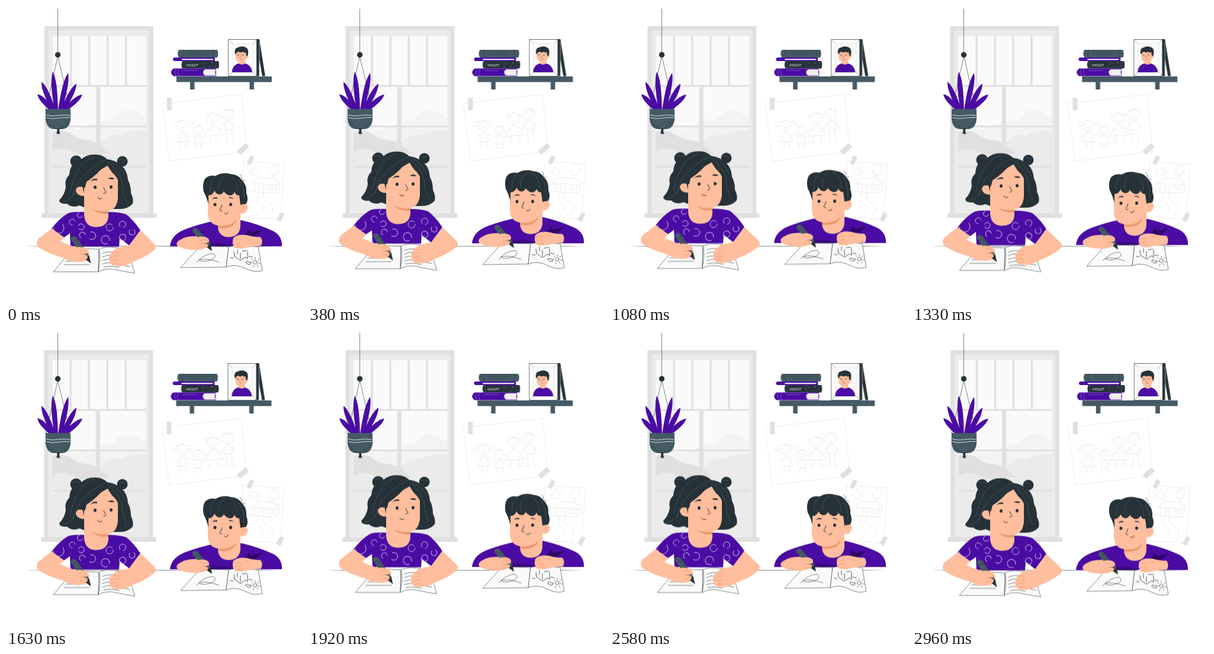
An HTML page that plays this animation: 500 px wide and 500 px high, repeating every 3 s.

```html
<!DOCTYPE html>
<html lang="en">
<head>
<meta charset="utf-8">
<title>Drawing together</title>
<style>
html, body { margin: 0; width: 100%; height: 100%; overflow: hidden; background: #fff; }
svg { display: block; width: 100vw; height: 100vh; }
.purple { fill: #4b0ca3; }
.dark { fill: #263238; }
.slate { fill: #455a64; }
.skin { fill: #ffbe9d; }
.shade { fill: #eb996e; }
.paper { fill: #fafafa; stroke: #263238; stroke-width: .6; stroke-linejoin: round; }
.g1 { fill: #e0e0e0; }
.g2 { fill: #ebebeb; }
.g3 { fill: #f3f3f3; }
.g4 { fill: #fafafa; }
.ink, .thin, .strand, .sketch, .crease, .fold { fill: none; stroke-linecap: round; stroke-linejoin: round; }
.ink { stroke: #263238; stroke-width: 1; }
.thin { stroke: #263238; stroke-width: .6; }
.strand { stroke: #5b6f79; stroke-width: .5; }
.sketch { stroke: #e3e3e3; stroke-width: .7; }
.crease { stroke: #eb996e; stroke-width: .7; }
.fold { stroke: #2d0762; stroke-width: .7; }
.sheet { fill: #fff; stroke: #e6e6e6; stroke-width: .7; }
.rings { fill: none; stroke: #d9c9f2; stroke-width: .9; stroke-linecap: round; }
</style>
</head>
<body>
<svg viewBox="0 0 500 500">

  <g transform="translate(.9 0)"><g id="room">
    <!-- window -->
    <path class="g1" d="M64 34H248V350H64z"/>
    <path class="g2" d="M71 41H241V350H71z"/>
    <path class="g4" d="M78 51H236V271H78z"/>
    <path class="g3" d="M78 212Q100 202 120 209Q140 200 158 197Q170 189 180 193Q194 174 207 176Q220 177 236 190V271H78z"/>
    <path class="g2" d="M152 236Q176 212 192 219Q212 207 236 211V271H152z"/>
    <path class="g1" d="M78 213Q92 208 106 214Q118 223 130 226Q150 226 164 240Q180 254 204 262H78z"/>
    <path class="g2" d="M78 246Q95 236 112 246Q136 256 160 250Q196 246 236 256V350H78z"/>
    <g class="g1">
      <path d="M107 51h3.500v83h-3.500zM138 51h3.500v83h-3.500zM169 51h3.500v83h-3.500zM200 51h3.500v83h-3.500z"/>
      <path d="M78 133.500h158v3H78zM78 202h158v3H78zM78 270h158v3H78zM151.500 137h7v213h-7z"/>
      <path d="M59 350H253V358H59z"/>
    </g>

    <!-- shelf -->
    <path class="slate" d="M287 119H448V128.5H287zM310 128h7.500v13h-7.500zM410.500 128h7.500v13h-7.500z"/>
    <path class="slate" d="M291 74H356Q359 80 356 87H291Q287 80 291 74z"/>
    <path class="strand" style="stroke:#263238" d="M298 74q-2 6 0 13M349 74q2 6 0 13M304 78h38M308 82h30"/>
    <path class="purple" d="M283 87H352V93H283Q279 90 283 87z"/>
    <path d="M296 89.200H349V91.300H296z" fill="#f5f5f5"/>
    <path class="dark" d="M297 93H358Q360 99 358 105.500H297Q294 99 297 93z"/>
    <path class="strand" d="M300 93v12M332 93v12"/>
    <g fill="#cfd8dc"><circle cx="337" cy="97" r=".6"/><circle cx="343" cy="102" r=".6"/><circle cx="347" cy="96" r=".7"/><circle cx="353" cy="101" r=".6"/><circle cx="354" cy="96" r=".5"/></g>
    <text x="303.500" y="101.700" font-family="Lato, 'Open Sans', sans-serif" font-size="6.400" font-style="italic" fill="#fff">VIOLET</text>
    <path class="purple" d="M282 105.500H354V118.500H282Q274 112 282 105.500z"/>
    <path d="M354 107H335Q329 112 335 117.500H354Q351 112 354 107z" fill="#f0f0f0"/>
    <path d="M286 106q-4 6 0 12M291 106q-4 6 0 12M298 109h24" fill="none" stroke="#9d7dd0" stroke-width=".6"/>

    <!-- portrait -->
    <path class="dark" d="M422 56H427L437 118.500H432L427 90V118.500H422z"/>
    <path class="strand" style="stroke:#fff" d="M427 62V118"/>
    <path d="M374.500 56.500H422.500V118.500H374.500z" fill="#fff" stroke="#263238" stroke-width=".7"/>
    <path d="M381 63H417V112H381z" fill="#fafafa" stroke="#d0d0d0" stroke-width=".5"/>
    <path class="thin" style="stroke-width:.4" d="M375 56.500l6 6.500M422 56.500l-5 6.500M375 118.500l6-6.500M422 118.500l-5-6.500"/>
    <path class="purple" d="M381 112Q381 100 392 97H403Q414 100 415 112z"/>
    <path class="skin" d="M387 76H407V83H408q2 3-2 5L403 93V97Q398 101 392 97V94Q387 92 387 86z"/>
    <path class="dark" d="M386 81Q384 71 391 70Q399 66 406 71Q410 76 407 85L405 84L404 78Q401 80 399 77Q395 80 392 77Q388 78 387 82z"/>
    <g class="dark"><circle cx="391" cy="83.500" r=".8"/><circle cx="399" cy="83.500" r=".8"/></g>
    <path class="thin" style="stroke-width:.4" d="M395 84l-.6 3.500M395 90q2 1 3-.5M389.500 81.500h2.500M398 81.500h2.500"/>

    <!-- family drawing -->
    <path class="sheet" d="M263 165L397 149L406 246L275 262z"/>
    <g class="sketch">
      <circle cx="297" cy="202" r="9"/>
      <path d="M289 198Q297 188 305 198M290 196q-8-3-10 8q5 1 8-3M305 195q8-2 10 5q-4 3-8 1M297 211L288 230L309 229zM292 216L284 222M302 215L311 219M295 230V240h-4M303 230V239h4M294 204q3 4 7 0M294 200v1M300 200v1"/>
      <circle cx="324" cy="211" r="8"/>
      <path d="M318 205q6-7 12 0M324 219q-7 1-6 14h13q0-14-7-14M318 222l-5-5M331 222l5-3M321 233v7h-3M328 233v6h4M321 213q3 3 6 0M321 209v1M327 209v1"/>
      <circle cx="349" cy="190" r="9.500"/>
      <path d="M340 188Q343 176 358 184M341 183q-6-1-5 6M357 183q6-2 5 5M349 200L334 220L367 218zM344 206L334 213M356 205L365 209M344 220V231h-5M357 219V230h6M345 193q4 4 8 0M346 187v1M352 187v1"/>
      <circle cx="374" cy="183" r="9.500"/>
      <path d="M365 180q4-9 18-1q0-4-4-6M374 193Q367 196 368 209H383Q384 195 374 193M368 197L362 207M382 196L387 206M371 209L373 231H369M380 208L382 229H386M371 186q3 4 7 0M371 180v1M377 180v1"/>
    </g>
    <path class="g1" d="M271 155h8v21h-8zM389 245L404 231.500L410 238L395 251z"/>

    <!-- house drawing -->
    <path class="sheet" d="M401 262L469 267L463 360L395 356z"/>
    <g class="sketch">
      <circle cx="419" cy="279" r="6"/>
      <path d="M419 270v-3M426 273l3-3M428 280h3M425 285l3 3M412 273l-3-3M411 280h-3M413 285l-3 3"/>
      <path d="M414 300L426 290L452 291L460 302L414 300M419 301V314L455 316V302M427 314V305h7v10M443 304h7v6h-7z"/>
      <path d="M446 283q-5-6 2-9q1-8 8-5q7 3 2 9q2 9-7 7q-4 2-5-2M452 284v7M455 294q8 0 6 9q2 10-6 13"/>
      <path d="M425 316Q420 330 432 336Q440 344 424 352M434 316Q431 326 445 334Q456 344 444 354M399 314q8-3 20 0"/>
    </g>
    <path class="g1" d="M406 265L412 252L419 255.500L412 269zM456 361L463 348L469.500 351L463 365z"/>
  </g></g>

  <!-- hanging plant -->
  <g>
    <path class="thin" d="M87.500 5V80M87.500 85L67.500 174M87.500 85L108.500 174"/>
    <circle class="dark" cx="87.500" cy="82.500" r="4.700"/>
    <path id="leaves" class="purple"/>
    <path class="slate" d="M67 174H109V192Q107 208 94 208H82Q69 208 67 192z"/>
    <path d="M68 184q10 3 20 1t20 0M68 188.500q10 3 20 1t20-1" fill="none" stroke="#e8edef" stroke-width=".9"/>
    <path class="thin" d="M67 190Q74 204 88 208Q102 204 109 190"/>
    <path class="dark" d="M86 207h4.500l-.5 4l1.500 6l-2.500-2l-1 3l-1-3l-2 1l1.500-5z"/>
  </g>

  <path class="dark" d="M32 406L60 405.600H430L466 406L430 406.300H60z" opacity=".75"/>

  <g transform="translate(0 .9)"><g id="kids">
    <!-- girl -->
    <g>
      <circle class="dark" cx="118.500" cy="261.500" r="10"/>
      <circle class="dark" cx="196.500" cy="261.500" r="9"/>
      <path class="dark" d="M149 250Q135 250 126 259Q108 264 107 284Q98 293 101 305Q99 318 90 327Q90 334 103 333Q112 341 124 336L140 342H192Q206 342 214 333Q216 325 211 315Q211 302 206 293Q205 276 194 268Q184 259 171 258Q162 249 149 250z"/>
      <path class="purple" d="M132 347Q113 346 105 349Q91 357 77 375L98 390L108 383L109 405.500H191L192 391L208 403.500L227 378Q216 361 203 351Q192 347 173 347z"/>
      <g id="rings" class="rings"></g>
      <path class="skin" d="M132 312V353Q134 373 153 372.500Q172 372 173 354V345Q187 343 189 324V288Q181 276 168 265Q156 283 136 296z"/>
      <path class="shade" d="M144 341Q157 348 173 345V350Q156 352 144 341z"/>
      <path class="skin" d="M134 306Q120 301 118 310Q119 320 133 320z"/>
      <path class="crease" d="M123 310q5-1 7 5"/>
      <path class="dark" d="M173 268Q163 273 154 280Q140 287 134 296Q131 303 132 315Q127 300 128 285Q140 262 168 259z"/>
      <path class="dark" d="M168 262Q173 272 179 280Q186 286 189 293V326Q190 338 187 342L204 338Q206 290 180 262z"/>
      <path class="strand" d="M168 259Q144 270 131 286Q118 298 113 322M150 253Q126 262 119 282Q113 292 108 315M171 262Q189 274 196 296Q196 312 204 330M176 261Q194 270 201 288M112 258q6-4 12 1M191 259q6-3 10 2M97 330q14-4 20-18"/>
      <ellipse class="dark" cx="150.500" cy="305.300" rx="2.500" ry="2.800"/>
      <ellipse class="dark" cx="177.500" cy="304.800" rx="2.500" ry="2.800"/>
      <path class="dark" d="M142.500 295.500Q147 289.500 154 291V293.500Q147 292.500 142.500 295.500zM172 290.500Q178 287 183.500 291Q178 292.500 172 290.500z"/>
      <path class="ink" d="M165 306Q167 311 169 313.500Q168 316 165 315.500M155 322Q157 327 162 324"/>
      <path class="paper" d="M80 448L114 407.500L157 410L156 448z"/>
      <path class="paper" d="M157 410Q166 405 180 406.500L205 409L217.500 450.500Q196 447 183 444Q168 441 156 448z"/>
      <path class="thin" d="M111 417h12M105 424h14M101 430h24M98 436h43M163 417q8-4 20-2l14 2M163 423q7-4 15-3M163 429q6-3 13-2M163 435q10-4 20-1l26 5M165 440q12-3 26 1M158 412Q160 430 156 446"/>
      <path class="skin" d="M77 375L55 392Q48 401 57 408Q73 418 96 424Q114 434 129 431Q140 430 139 423Q143 416 137 410Q128 403 113 405Q103 402 92 396.500L98 390z"/>
      <path class="skin" d="M227 378L249 399Q256 405 251 411Q235 424 215 431Q202 439 189 439Q176 438 175 431Q172 421 179 415Q186 407 196 406L208 403.500z"/>
      <path class="crease" d="M176 424q8-4 14-3M176 430q8-4 14-2M179 435q6-3 11-2M179 415q8 0 12 2"/>
      <path class="slate" d="M110 394Q109 389 114 388Q118 388 120 391L141 422L133 427z"/>
      <path class="dark" d="M133 426L140.500 421L143.500 434z"/>
      <path class="thin" d="M113 398l8-5M119 394l16 26"/>
      <path class="skin" d="M112 410Q122 403 133 408Q142 413 137 417L126 419Q138 418 138 424Q136 429 126 427z"/>
      <path class="crease" d="M124 412q8-3 13 2M125 419q8-2 13 1M126 425q6 0 10-2"/>
    </g>

    <!-- boy -->
    <g>
      <path class="purple" d="M356 361Q328 367 306 375Q279 384 277 405H466Q467 388 452 379.500Q428 368 398 361z"/>
      <path class="fold" d="M316 403Q350 396 384 404M405 388Q416 380 432 378M306 389q14-8 28-8"/>
      <path d="M403 386L411 376L414 382L432 378L420 388z" fill="#2d0762"/>
      <path d="M318 405Q350 396 392 405z" fill="#39087e"/>
      <path class="skin" d="M341 306H396V333Q404 330 408 336Q410 345 402 349Q398 350 396 349V372Q394 389 376 389.500Q359 389 358 372V370Q342 367 341 350z"/>
      <path class="shade" d="M358 370Q377 373 390 360Q384 377 358 374z"/>
      <path class="crease" d="M399 343q1-5 6-5"/>
      <path class="dark" d="M342 334Q339 322 334 313Q331 300 336 291Q343 284 354 286Q366 279 380 283Q393 284 398 293Q407 300 406 315Q410 325 406 333L396 335L394 319Q388 319 386 313Q384 319 377 319Q370 316 368 312Q365 319 358 317Q354 315 352 311Q350 318 342 319z"/>
      <path class="thin" d="M394 299Q397 291 404 294M397 296Q400 287 395 283"/>
      <path class="strand" d="M354 287Q343 296 345 312M372 284Q357 291 359 309M376 284Q391 292 391 312M393 293Q403 304 402 325"/>
      <ellipse class="dark" cx="353" cy="334.500" rx="2.500" ry="2.800"/>
      <ellipse class="dark" cx="379.500" cy="334.300" rx="2.500" ry="2.800"/>
      <path class="dark" d="M348 325.500Q351 321 357 322.500V324.500Q352 323.500 348 325.500zM375 323Q380 320 385 325Q380 323.500 375 323z"/>
      <path class="ink" d="M365 335Q363 341 361 343.500Q362 346 365 345.500M369 349Q373 353 375 347"/>
      <path class="paper" d="M295 441L328 404.500L376 406L372 440z"/>
      <path class="paper" d="M376 406Q385 403 400 404L426 406L433 446Q421 450 408 444Q388 433 372 440z"/>
      <path class="thin" d="M322 432Q334 418 350 417Q358 423 346 428Q332 433 326 428Q338 424 360 432"/>
      <path class="ink" style="stroke-width:.8" d="M385 414l1 8l10 7l9-6l3 3V414M391 411v7M396 416v10M399 413l8-1M379 424l5 1M405 432q2-4 5 0q4-2 3 3q-5 2-8-3M410 422l6 1"/>
      <circle class="thin" cx="421" cy="432" r="3"/>
      <path class="thin" d="M421 427v-3M425 429l3-3M426 433l4 1M424 436l2 3M419 437l-1 3M416 432h-2M417 428l-2-2"/>
      <path class="skin" d="M289 404Q286 397 296 393Q304 388 317 388Q334 386 342 392Q345 400 340 406Q328 413 316 411Q300 411 289 404z"/>
      <path class="skin" d="M431 404Q435 393 429 389Q418 390 407 386Q391 384 384 391Q381 400 386 407Q396 411 407 407Q419 405 431 404z"/>
      <path class="crease" d="M385 396q6-4 12-2M385 402q6-4 12-2M388 407q5-3 10-2M404 391q6 0 9 4"/>
      <path class="slate" d="M315 380Q314 375 319 374Q323 374 325 377L346 402L339 407z"/>
      <path class="dark" d="M339 406.500L345.500 401.500L348 413z"/>
      <path class="thin" d="M318 383l7-5M325 380l15 20"/>
      <path class="skin" d="M318 393Q328 386 338 390Q346 395 341 399L330 401Q343 400 341 405Q337 410 327 409z"/>
      <path class="crease" d="M328 395q8-3 13 1M329 401q8-2 12 1M328 407q6 0 10-2"/>
    </g>
  </g></g>
</svg>

<script>
const get = id => document.getElementById(id);

// A blade from the pot to its tip, widest past the middle
function leaf([base, x, y]) {
  const foot = 177, width = 5;
  const dx = x - base, dy = y - foot, len = Math.hypot(dx, dy);
  const at = (t, side) => {
    const w = side * width / len;
    return `${base + dx * t - dy * w} ${foot + dy * t + dx * w}`;
  };
  return `M${at(0, .6)}C${at(.45, 1)} ${at(.8, 1.1)} ${x} ${y}` +
         `C${at(.8, -1.1)} ${at(.45, -1)} ${at(0, -.6)}z`;
}
const tips = [[80, 53, 149], [81, 60, 128], [85, 79, 111], [91, 105, 113], [95, 119, 131], [97, 129, 149.5]];
get("leaves").setAttribute("d", tips.map(leaf).join(""));

// x, y, radius, dash length, turn
const rings = [
  [89, 374, 9, 34, -40], [112, 364, 5, 22, 90], [125, 352, 4.5, 18, 20],
  [127, 372, 5, 26, 200], [145, 387, 6.5, 26, 250], [129, 386, 5, 20, 120],
  [168, 394, 7, 38, 60], [175, 373, 6, 33, 0], [197, 368, 5.5, 28, 140],
  [197, 390, 5.5, 32, 30], [213, 381, 5, 24, 300]
];
get("rings").innerHTML = rings.map(([x, y, r, dash, turn]) =>
  `<circle cx="${x}" cy="${y}" r="${r}" stroke-dasharray="${dash} 60" transform="rotate(${turn} ${x} ${y})"/>`
).join("");

// Steady out and back
function drift(id, x, y) {
  const rest = "translate(0px, 0px)";
  get(id).animate(
    { transform: [rest, `translate(${x}px, ${y}px)`, rest] },
    { duration: 1500, iterations: Infinity, easing: "linear" }
  ).startTime = document.timeline.currentTime;
}
drift("room", -3, 0);
drift("kids", 0, -10);
</script>
</body>
</html>
```
